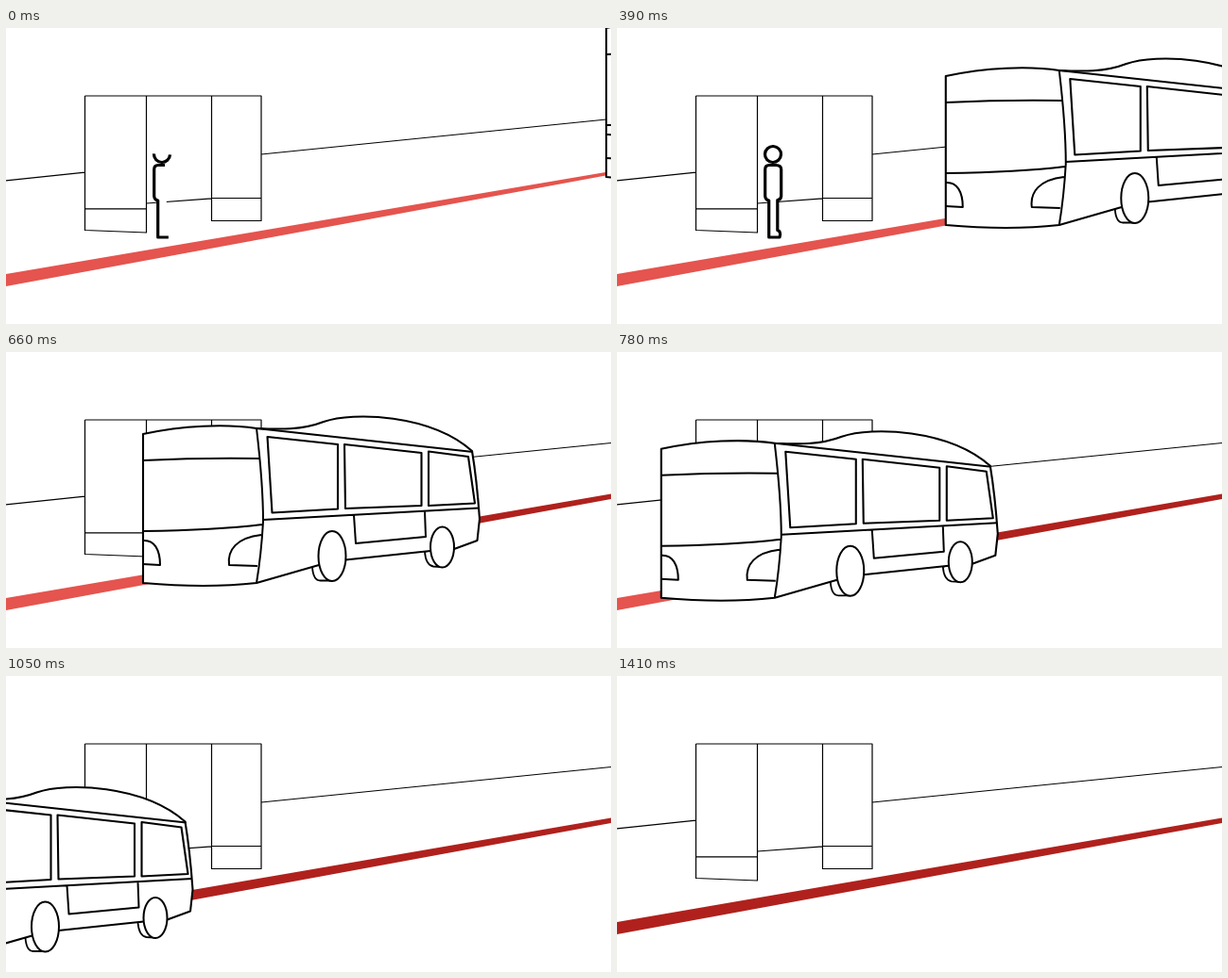
Recreate the animation shown at these times as an HTML page with a canvas. Size 640 by 314 pixels, loop 1.44 s.

```html
<!DOCTYPE html>
<html lang="en">
<head>
<meta charset="utf-8">
<title>Bus stop</title>
<style>
  html, body { margin: 0; width: 100%; height: 100%; overflow: hidden; background: #fff; }
  canvas { display: block; width: 640px; height: 314px; }
</style>
</head>
<body>
<canvas id="stage" width="640" height="314"></canvas>
<script>
const ctx = document.getElementById('stage').getContext('2d');
const LOOP = 1440;
const STEP = 30;
const LIGHT_RED = '#e5544e';
const DARK_RED = '#b0211d';

// Bus offset over time: [ms, dx, dy]
const busKeys = [
  [0, 377, -67], [240, 202, -36], [510, 0, 0], [660, -113, 20],
  [930, -334, 55.5], [1170, -499, 83.5], [1440, -686, 116]
];

function busOffset(t) {
  const i = busKeys.findIndex(key => key[0] > t);
  const [t0, x0, y0] = busKeys[i - 1];
  const [t1, x1, y1] = busKeys[i];
  const k = (t - t0) / (t1 - t0);
  return { x: x0 + (x1 - x0) * k, y: y0 + (y1 - y0) * k };
}

function paint(path, width, fill) {
  if (fill) {
    ctx.fillStyle = fill;
    ctx.fill(path);
  }
  ctx.lineWidth = width;
  ctx.stroke(path);
}

const shelter = new Path2D(`
  M83.5 72H270V204.5H217.5V72M83.5 72V214.5L148.5 217V72
  M83.5 191.8H148.5M217.5 180.5H270M148.5 186L217.5 180.8
  M0 161.8L83.5 153.2M270 134L640 96.5`);

const personBody = new Path2D(`
  M168 145.5H161Q156.7 145.5 156.7 150V178Q156.7 182 160.7 183
  V222H172Q174 216 169.8 214.5V182.5Q173.7 182 173.7 178V150Q173.7 145.5 168 145.5`);
const personHead = new Path2D();
personHead.arc(165, 134, 8.5, 0.05, 0.05 + Math.PI * 2);

const busBody = new Path2D(`
  M258 67C300 58 345 56 378 61C402 62 426 63 449 54C480 43 562 46 606 85
  Q611 115 614 157L611.5 180L587 189L562 191L472 200.5L444 206L378 225
  Q325 231 258 225Z`);
const busLines = new Path2D(`
  M378 61C382 95 385 130 385 160Q383 195 378 225M378 61L607 86
  M258 95Q320 92 381 93M258 170Q335 169 384 163
  M385 158L613.5 145.5M481 153L483 183L557 176L556 149
  M258 180C270 179 276 190 276 206L258 205
  M383 174C357 177 347 190 349 206L379 207`);
const busWindows = new Path2D(`
  M389.5 70L464 78V146.5L394.5 150.5Z
  M471 78L552.5 87V143L472 146Z
  M560 85.5L602 91L609 140.5L560 143Z`);
const tyres = new Path2D(`
  M444 204L437 208Q438 223 446 222.5H458L460 200Z
  M563 190L556 192Q557 206 565 207.5L574 208V190Z`);
const wheels = new Path2D();
for (const [x, y, rx, ry] of [[458, 196.5, 14.5, 26.5], [574.5, 187, 12.5, 21.5]]) {
  wheels.moveTo(x + rx, y);
  wheels.ellipse(x, y, rx, ry, 0, 0, Math.PI * 2);
}

function drawKerb(split) {
  const bands = [
    [LIGHT_RED, -1, split, 152, 155.5],
    [DARK_RED, split, 641, 150.5, 156]
  ];
  for (const [color, left, right, endTop, endBottom] of bands) {
    if (right <= left) continue;
    ctx.save();
    ctx.beginPath();
    ctx.rect(left, 0, right - left, 314);
    ctx.clip();
    ctx.beginPath();
    ctx.moveTo(0, 261);
    ctx.lineTo(640, endTop);
    ctx.lineTo(640, endBottom);
    ctx.lineTo(0, 274);
    ctx.fillStyle = color;
    ctx.fill();
    ctx.restore();
  }
}

function drawPerson(t) {
  const progress = Math.min(1, 0.5 + t / 240);
  for (const [path, length] of [[personBody, 198], [personHead, 53.4]]) {
    ctx.setLineDash(progress < 1 ? [length * progress, 999] : []);
    paint(path, 3.2, '#fff');
  }
  ctx.setLineDash([]);
}

function drawBus({ x, y }) {
  ctx.save();
  ctx.translate(x, y);
  paint(tyres, 1.8, '#fff');
  paint(busBody, 2.1, '#fff');
  paint(busLines, 2);
  paint(busWindows, 2.1);
  paint(wheels, 2, '#fff');
  ctx.restore();
}

function draw(t) {
  const bus = busOffset(t);
  ctx.fillStyle = '#fff';
  ctx.fillRect(0, 0, 640, 314);
  ctx.strokeStyle = '#000';
  ctx.lineJoin = 'round';
  paint(shelter, 1.2);
  drawKerb(320 + bus.x);
  if (t < 690) drawPerson(t);
  drawBus(bus);
}

function tick() {
  const t = performance.now() % LOOP;
  draw(Math.floor(t / STEP) * STEP);
  requestAnimationFrame(tick);
}
tick();
</script>
</body>
</html>
```
